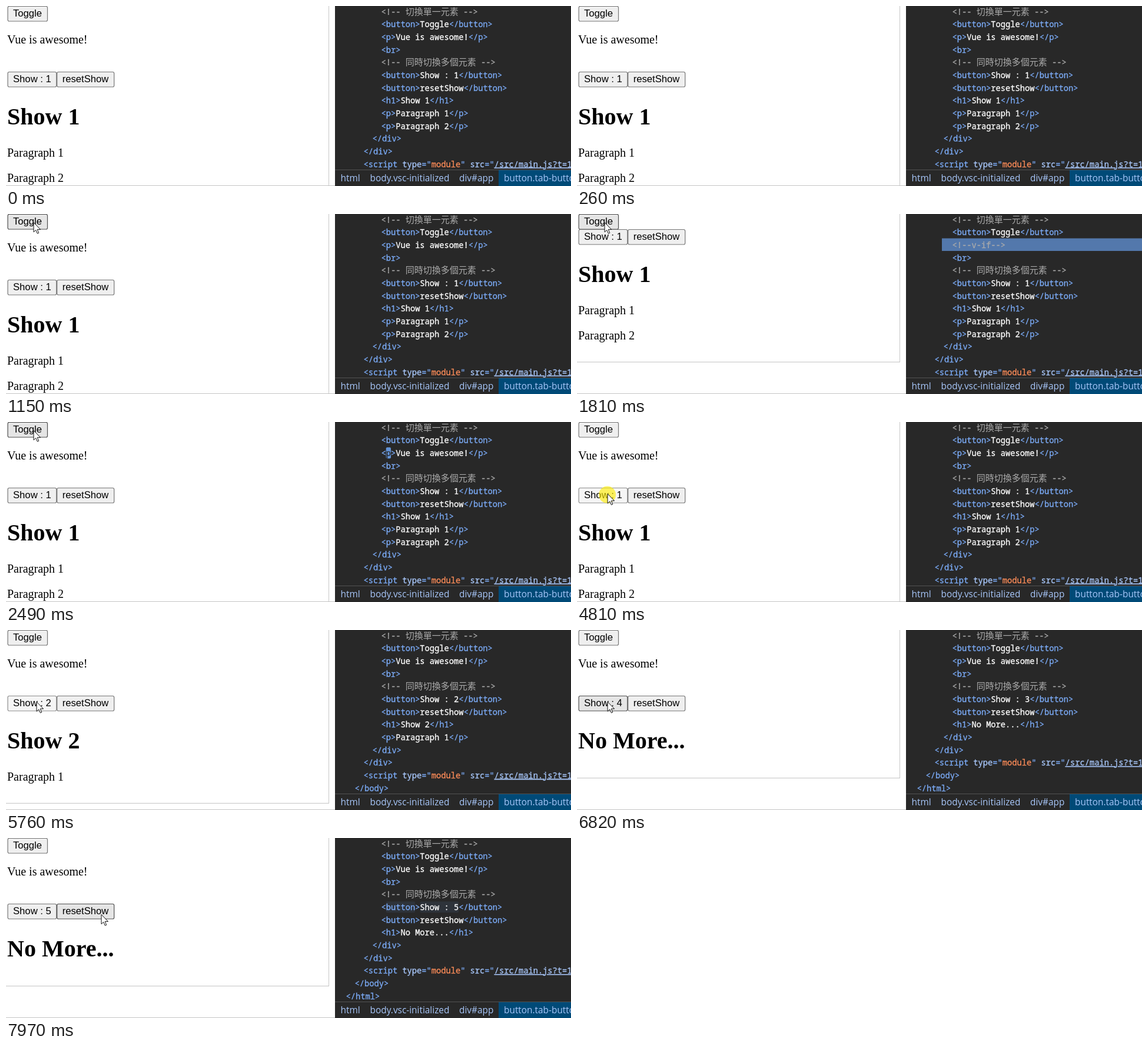
Write an HTML page that moves like this. It is 960 px wide and 307 px high and loops after 8 s.

```html
<!DOCTYPE html>
<html lang="zh-Hant">
<head>
<meta charset="utf-8">
<title>Conditional rendering</title>
<style>
html, body { margin: 0; width: 100%; height: 100%; overflow: hidden; background: #fff; }
svg { display: block; width: 960px; height: 307px; }
text { white-space: pre; }
.p { font: 20px "Liberation Serif", "Times New Roman", serif; }
.h { font: bold 40px "Liberation Serif", "Times New Roman", serif; }
.btn { font: 16.67px "Liberation Sans", Arial, sans-serif; }
.code { font: 13.72px "Noto Sans Mono", "DejaVu Sans Mono", monospace; }
.code tspan { fill: currentColor; stroke: currentColor; stroke-width: .3px; }
.code .cjk { font: 15px "Noto Sans CJK TC", "Noto Sans CJK JP", "Noto Sans CJK", sans-serif; stroke: none; }
.crumb { font: 15.4px "Open Sans", "Noto Sans", sans-serif; fill: #a8c7fa; }
.tag { color: #7cacf8; }
.txt { color: #fff; }
.note { color: #ababab; }
.attr { color: #a8c7fa; }
.val { color: #fe8d59; }
.link { color: #a8c7fa; text-decoration: underline; }
</style>
</head>
<body>
<svg id="stage" viewBox="0 0 960 307"></svg>
<script>
const LOOP = 8000, LAG = 70, FLASH = 660, CHAR = 8.232, ROW = 21.67;
const GLOW = '#6aa2f0';
const stage = document.getElementById('stage');

// [press, release]
const togglePresses = [[1480, 1610], [2350, 2420], [3110, 3190], [3600, 3730]];
const showPresses = [[4680, 4940], [5720, 5880], [6690, 6810], [7240, 7350]];
const presses = togglePresses.concat(showPresses);

// [start, end, x0, y0, x1, y1]
const moves = [
  [690, 1150, 190, -14, 46.5, 14],
  [3980, 4400, 46.5, 14, 51.5, 122],
  [7560, 7960, 51.5, 122, 161.5, 130]
];

const esc = s => s.replace(/&/g, '&amp;').replace(/</g, '&lt;').replace(/>/g, '&gt;');
const text = (x, y, cls, s) => `<text x="${x}" y="${y}" class="${cls}">${esc(s)}</text>`;
const rect = (x, y, w, h, fill, more = '') =>
  `<rect x="${x}" y="${y}" width="${w}" height="${h}" fill="${fill}" ${more}/>`;

function pageState(t) {
  const done = list => list.filter(p => t >= p[1]);
  const toggles = done(togglePresses), clicks = done(showPresses);
  const last = list => list.length ? list[list.length - 1][1] : -1e4;
  return {
    on: toggles.length % 2 === 0,
    count: 1 + clicks.length,
    toggled: last(toggles),
    clicked: last(clicks)
  };
}

function cursorAt(t) {
  let pos = null;
  for (const [a, b, x0, y0, x1, y1] of moves) {
    if (t < a) break;
    const u = Math.min(1, (t - a) / (b - a));
    const k = u * u * (3 - 2 * u);
    pos = [x0 + (x1 - x0) * k, y0 + (y1 - y0) * k];
  }
  return pos;
}

function button(x, y, w, label, cursor, down) {
  const hover = cursor && cursor[0] >= x && cursor[0] < x + w && cursor[1] >= y && cursor[1] < y + 26;
  const [fill, line] = !hover ? ['#efefef', '#767676'] : down ? ['#f5f5f5', '#8d8d8d'] : ['#e5e5e5', '#4f4f4f'];
  return rect(x + .5, y + .5, w - 1, 25.5, fill, `stroke="${line}" stroke-width="1.2" rx="2.5"`) +
    text(x + 9.5, y + 18, 'btn', label);
}

function page(s, cursor, down) {
  const dy = s.on ? 0 : -86;
  const paras = Math.max(0, 3 - s.count);
  const bottom = 338 + dy - 43 * (2 - paras);
  let out = rect(0, 306, 559, 1, '#c4c4c4') +
    rect(0, bottom, 549, 1, '#c4c4c4') +
    rect(548, 0, 1, bottom, '#c8c8c8');
  out += button(2.5, 0, 68.5, 'Toggle', cursor, down);
  if (s.on) out += text(2, 64, 'p', 'Vue is awesome!');
  out += button(2.5, 112 + dy, 83.7, 'Show : ' + s.count, cursor, down);
  out += button(86.2, 112 + dy, 98, 'resetShow', cursor, down);
  out += text(2, 202 + dy, 'h', heading(s.count));
  for (let i = 0; i < paras; i++) out += text(2, 257 + dy + 43 * i, 'p', 'Paragraph ' + (i + 1));
  return out;
}

const heading = n => n < 3 ? 'Show ' + n : 'No More...';

// Code rows are lists of [string, class, flash strength]
const element = (name, body, tagFlash = 0, bodyFlash = 0) => [
  ['<', 'tag'], [name, 'tag', tagFlash], ['>', 'tag'],
  [body, 'txt', bodyFlash], [`</${name}>`, 'tag']
];
const comment = s => [['<!-- ', 'note'], [s, 'note cjk'], [' -->', 'note']];
const closing = name => [[`</${name}>`, 'tag']];

function codeRow(i, x, segs) {
  const y = 14.5 + ROW * i;
  let marks = '', spans = '', col = 0;
  for (const [s, cls, flash = 0] of segs) {
    if (flash > 0) {
      marks += rect(x + col * CHAR, y - 14.5, s.length * CHAR, 19, GLOW, `opacity="${flash}" rx="2"`);
    }
    const tint = flash > .5 ? ' style="color:#282828"' : '';
    spans += `<tspan class="${cls}"${tint}>${esc(s)}</tspan>`;
    col += s.length;
  }
  return marks + `<text x="${x}" y="${y}" class="code">${spans}</text>`;
}

function inspector(t) {
  const s = pageState(t - LAG);
  const glow = since => {
    const u = (t - LAG - since) / FLASH;
    return u < 1 ? .88 * Math.pow(1 - u, 1.3) : 0;
  };
  const swap = glow(s.toggled), click = glow(s.clicked);
  const fresh = s.count <= 3 ? click : 0;
  const rows = [
    [637.5, comment('切換單一元素')],
    [637.5, element('button', 'Toggle')],
    [637.5, s.on ? element('p', 'Vue is awesome!', swap) : [['<!--v-if-->', 'note']]],
    [637.5, [['<br>', 'tag']]],
    [637.5, comment('同時切換多個元素')],
    [637.5, element('button', 'Show : ' + s.count, click, click)],
    [637.5, element('button', 'resetShow')],
    [637.5, element('h1', heading(s.count), fresh)]
  ];
  for (let i = 1; i <= 3 - s.count; i++) rows.push([637.5, element('p', 'Paragraph ' + i, fresh)]);
  rows.push(
    [622.5, closing('div')],
    [607.5, closing('div')],
    [607.5, [['<script', 'tag'], [' type', 'attr'], ['="', 'tag'], ['module', 'val'], ['"', 'tag'],
      [' src', 'attr'], ['="', 'tag'], ['/src/main.js?t=170', 'link']]],
    [592.5, closing('body')],
    [577.5, closing('html')]
  );
  let out = rect(559, 0, 401, 307, '#282828');
  if (!s.on && swap) out += rect(620, 41.5, 340, 21.5, GLOW, `opacity="${swap}"`);
  rows.forEach(([x, segs], i) => { out += codeRow(i, x, segs); });
  out += rect(559, 279, 401, 28, '#282828') + rect(559, 279, 401, 1, '#525252') +
    rect(837, 280, 123, 27, '#004a77');
  out += text(568.5, 299, 'crumb', 'html') + text(618.5, 299, 'crumb', 'body.vsc-initialized') +
    text(770, 299, 'crumb', 'div#app') + text(846, 299, 'crumb', 'button.tab-button');
  return out;
}

function pointer(pos, held) {
  if (!pos) return '';
  const [x, y] = pos;
  const spot = held > 70 ? `<circle cx="${x}" cy="${y + 2}" r="14.5" fill="#ffee00" opacity=".62"/>` : '';
  return spot + `<path transform="translate(${x} ${y})" d="M.5 .5V16.8L4.2 13.3L6.8 19.3L9.2 18.3L6.7 12.4H12Z"
    fill="#fff" stroke="#111" stroke-width="1" stroke-linejoin="round"/>`;
}

function draw(t) {
  const cursor = cursorAt(t);
  const press = presses.find(p => t >= p[0] && t < p[1]);
  stage.innerHTML = rect(0, 0, 960, 307, '#fff') + page(pageState(t), cursor, !!press) +
    inspector(t) + pointer(cursor, press ? t - press[0] : 0);
}

const start = performance.now();
function tick() {
  draw((performance.now() - start) % LOOP);
  requestAnimationFrame(tick);
}
tick();
</script>
</body>
</html>
```
